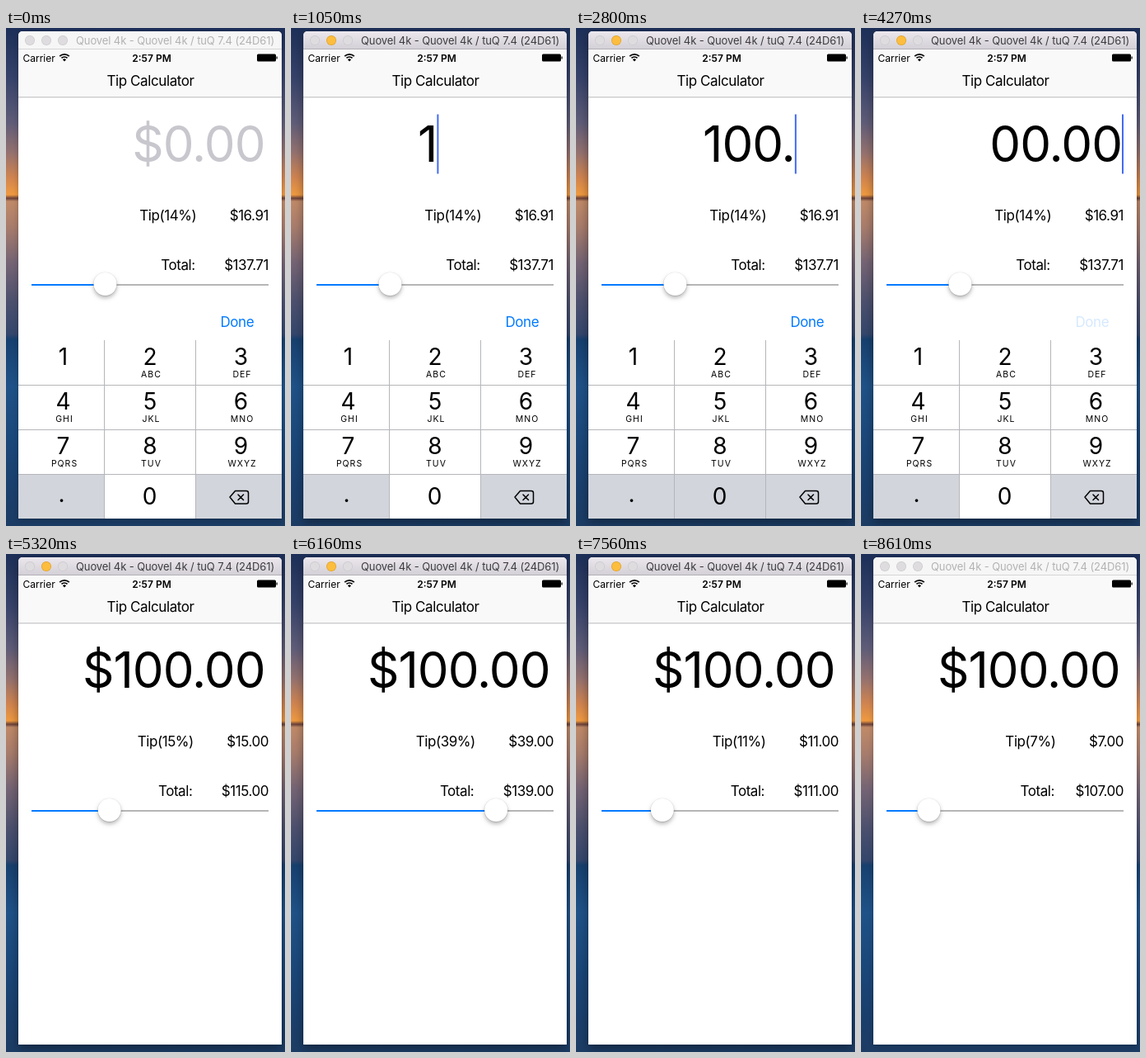
These frames come from a looping animation (339 by 603 pixels, 8.75 s). An HTML page with a canvas:

```html
<!DOCTYPE html>
<html lang="en">
<head>
<meta charset="utf-8">
<title>Tip Calculator</title>
<style>
html, body { margin: 0; width: 100%; height: 100%; overflow: hidden; background: #10233f; }
canvas { display: block; }
</style>
</head>
<body>
<canvas id="stage" width="339" height="603"></canvas>
<script>
const ctx = document.getElementById('stage').getContext('2d');
const LOOP = 8750, STEP = 70;
const BLUE = '#007aff', KEY_GREY = '#d2d5dc';

// [time, typed text]
const typing = [[0, ''], [980, '1'], [1680, '10'], [1960, '100'], [2380, '100.'], [2870, '100.0'], [3080, '100.00']];
// [from, to, key]
const presses = [[910, 1050, '1'], [1610, 1680, '0'], [1890, 1960, '0'], [2240, 2380, '.'], [2800, 2940, '0'], [3010, 3150, '0']];
// [time, value]
const knobPath = [[5250, 120.5], [5320, 125.7], [5530, 125.7], [6440, 304], [7000, 224.5], [7350, 172], [7630, 82.5]];
const cursorPath = [[280, 0], [420, 1], [3640, 1], [3850, 0], [4130, 0], [4270, 1]];

const keys = [
  ['1', ''], ['2', 'ABC'], ['3', 'DEF'],
  ['4', 'GHI'], ['5', 'JKL'], ['6', 'MNO'],
  ['7', 'PQRS'], ['8', 'TUV'], ['9', 'WXYZ'],
  ['.', ''], ['0', ''], ['del', '']
];
const colEdges = [15, 120, 231, 335];
const rowEdges = [378, 433, 487, 541, 594];

function along(path, t) {
  if (t <= path[0][0]) return path[0][1];
  for (let i = 1; i < path.length; i++) {
    const [t0, a] = path[i - 1], [t1, b] = path[i];
    if (t <= t1) return a + (b - a) * (t - t0) / (t1 - t0);
  }
  return path[path.length - 1][1];
}

function setFont(size, spacing = 0, weight = 400) {
  ctx.font = `${weight} ${size}px Inter, Roboto, sans-serif`;
  ctx.letterSpacing = spacing + 'px';
}

function text(str, x, y, align = 'left', color = '#000') {
  ctx.textAlign = align;
  ctx.fillStyle = color;
  ctx.fillText(str, x, y);
}

function rect(x, y, w, h, color) {
  ctx.fillStyle = color;
  ctx.fillRect(x, y, w, h);
}

function disc(x, y, r, color) {
  ctx.beginPath();
  ctx.arc(x, y, r, 0, Math.PI * 2);
  ctx.fillStyle = color;
  ctx.fill();
}

function gradient(y0, y1, stops) {
  const g = ctx.createLinearGradient(0, y0, 0, y1);
  for (const [pos, color] of stops) g.addColorStop(pos, color);
  return g;
}

function shadow(color, blur = 0, dy = 0) {
  ctx.shadowColor = color;
  ctx.shadowBlur = blur;
  ctx.shadowOffsetY = dy;
}

function drawDesktop() {
  rect(0, 0, 339, 603, gradient(0, 603, [
    [0, '#1c2f58'], [.1, '#36426a'], [.19, '#5f5c78'], [.25, '#94716f'], [.3, '#d08450'],
    [.335, '#f09a40'], [.342, '#6a4038'], [.348, '#c08a68'], [.4, '#a87c6c'], [.47, '#756474'],
    [.55, '#4c506e'], [.615, '#34466c'], [.625, '#17406f'], [.72, '#1f5288'], [.84, '#1a4678'],
    [.93, '#1a3f6c'], [1, '#1c3c64']
  ]));
}

function drawWindow(active) {
  shadow(active ? 'rgba(0,0,0,.4)' : 'rgba(0,0,0,.25)', active ? 12 : 7, active ? 4 : 2);
  ctx.beginPath();
  ctx.roundRect(15, 4, 320, 590, [5, 5, 0, 0]);
  ctx.fillStyle = '#fff';
  ctx.fill();
  shadow('transparent');
  ctx.save();
  ctx.clip();
  rect(15, 4, 320, 22, active ? gradient(4, 26, [[0, '#ebe7ed'], [1, '#d3cfd6']]) : '#f6f6f6');
  rect(15, 25, 320, 1, active ? '#b4b0b6' : '#d6d6d6');
  ctx.restore();
  [29, 49, 69].forEach((x, i) => {
    const yellow = active && i === 1;
    disc(x, 15, 6, yellow ? '#dfa023' : '#cbc9cc');
    disc(x, 15, 5.3, yellow ? '#fdbd3e' : '#dedcdf');
  });
  setFont(13, -.1);
  text('Quovel 4k - Quovel 4k / tuQ 7.4 (24D61)', 205.5, 20, 'center', active ? '#3d3b3e' : '#b2b2b2');
}

function drawHeader() {
  rect(15, 26, 320, 57, '#f9f9f9');
  rect(15, 83, 320, 1.5, '#cfcfd1');
  setFont(12);
  text('Carrier', 20.5, 41);
  setFont(12, 0, 600);
  text('2:57 PM', 177, 41, 'center');

  ctx.strokeStyle = '#000';
  ctx.lineWidth = 1.7;
  for (const r of [5, 8.2]) {
    ctx.beginPath();
    ctx.arc(71, 40, r, -Math.PI * .75, -Math.PI * .25);
    ctx.stroke();
  }
  ctx.beginPath();
  ctx.moveTo(71, 40.5);
  ctx.arc(71, 40, 2.7, -Math.PI * .78, -Math.PI * .22);
  ctx.fill();

  ctx.beginPath();
  ctx.roundRect(305, 31.5, 23, 9, 1.5);
  ctx.fill();
  rect(328.5, 34.5, 1.2, 3, '#000');

  setFont(17, -.4);
  text('Tip Calculator', 175.5, 70, 'center');
}

function drawAmount(t) {
  const typed = typing.findLast(([from]) => t >= from)[1];
  setFont(60, -1);
  if (t >= 4340) return text('$100.00', 314.5, 162, 'right');
  if (!typed) text('$0.00', 314.5, 162, 'right', '#c7c7cd');
  const end = Math.min(154 + ctx.measureText(typed).width, 317);
  ctx.save();
  ctx.beginPath();
  ctx.rect(154, 100, 165, 80);
  ctx.clip();
  text(typed, end, 162, 'right');
  ctx.globalAlpha = along(cursorPath, t);
  rect(end, 104.5, 2, 72, '#426bf2');
  ctx.restore();
}

function drawTip(t, knob) {
  const percent = Math.round((knob - 45.5) / 5.18);
  const done = t >= 4340;
  const tip = done ? percent : 16.91;
  const total = done ? 100 + percent : 137.71;
  const tipText = '$' + tip.toFixed(2);
  setFont(17, -.45);
  const labelEnd = 319 - ctx.measureText(tipText).width - 40.5;
  text(`Tip(${percent}%)`, labelEnd, 233, 'right');
  text(tipText, 319, 233, 'right');
  text('Total:', labelEnd - 1.5, 293, 'right');
  text('$' + total.toFixed(2), 319, 293, 'right');
}

function drawSlider(knob) {
  rect(31, 310, 288, 2, '#b6b6b7');
  rect(31, 310, knob - 31, 2, BLUE);
  disc(knob, 310.2, 14.5, 'rgba(0,0,0,.13)');
  shadow('rgba(0,0,0,.28)', 5, 3);
  disc(knob, 310, 14, '#fff');
  shadow('transparent');
}

function drawDelete() {
  ctx.strokeStyle = '#000';
  ctx.lineWidth = 1.5;
  ctx.lineJoin = ctx.lineCap = 'round';
  ctx.beginPath();
  ctx.moveTo(272, 568);
  ctx.lineTo(278.5, 560.5);
  ctx.arcTo(294.5, 560.5, 294.5, 576, 2.5);
  ctx.arcTo(294.5, 576, 278.5, 576, 2.5);
  ctx.lineTo(278.5, 576);
  ctx.closePath();
  ctx.moveTo(282, 565);
  ctx.lineTo(288.5, 571.5);
  ctx.moveTo(288.5, 565);
  ctx.lineTo(282, 571.5);
  ctx.stroke();
}

function drawKeyboard(t) {
  const p = Math.min(1, Math.max(0, (t - 4300) / 520));
  if (p === 1) return;
  const press = presses.find(([from, to]) => t >= from && t < to);
  ctx.save();
  ctx.beginPath();
  ctx.rect(15, 334, 320, 260);
  ctx.clip();
  ctx.translate(0, 260 * (1 - (1 - p) ** 3.5));
  rect(15, 378, 320, 216, '#fff');

  ctx.globalAlpha = t >= 4200 && t < 4340 ? .17 : 1;
  setFont(17, -.45);
  text('Done', 260.5, 362, 'left', BLUE);
  ctx.globalAlpha = 1;

  keys.forEach(([key, letters], i) => {
    const col = i % 3, row = Math.floor(i / 3);
    const x = colEdges[col], y = rowEdges[row];
    const special = key === '.' || key === 'del';
    const pressed = !!press && press[2] === key;
    if (special !== pressed) rect(x, y, colEdges[col + 1] - x, rowEdges[row + 1] - y, KEY_GREY);
    if (key === 'del') return drawDelete();
    const cx = row === 3 ? [67.5, 174.5][col] : [69.5, 175, 285.5][col];
    setFont(28);
    text(key, cx, [408, 462, 516, key === '.' ? 574 : 577][row], 'center');
    setFont(10.5, 1);
    text(letters, cx + 1.5, [423, 477, 531][row], 'center');
  });

  for (const x of [119, 230]) rect(x, 378, 1, 216, '#b5b6ba');
  for (const y of [432, 486, 540]) rect(15, y, 320, 1, '#b5b6ba');
  ctx.restore();
}

function draw(t) {
  const knob = along(knobPath, t);
  drawDesktop();
  drawWindow(t >= 840 && t < 8610);
  drawHeader();
  drawAmount(t);
  drawTip(t, knob);
  drawSlider(knob);
  drawKeyboard(t);
}

const start = performance.now();
function frame() {
  const t = (performance.now() - start) % LOOP;
  draw(Math.floor(t / STEP) * STEP);
  requestAnimationFrame(frame);
}
frame();
</script>
</body>
</html>
```
